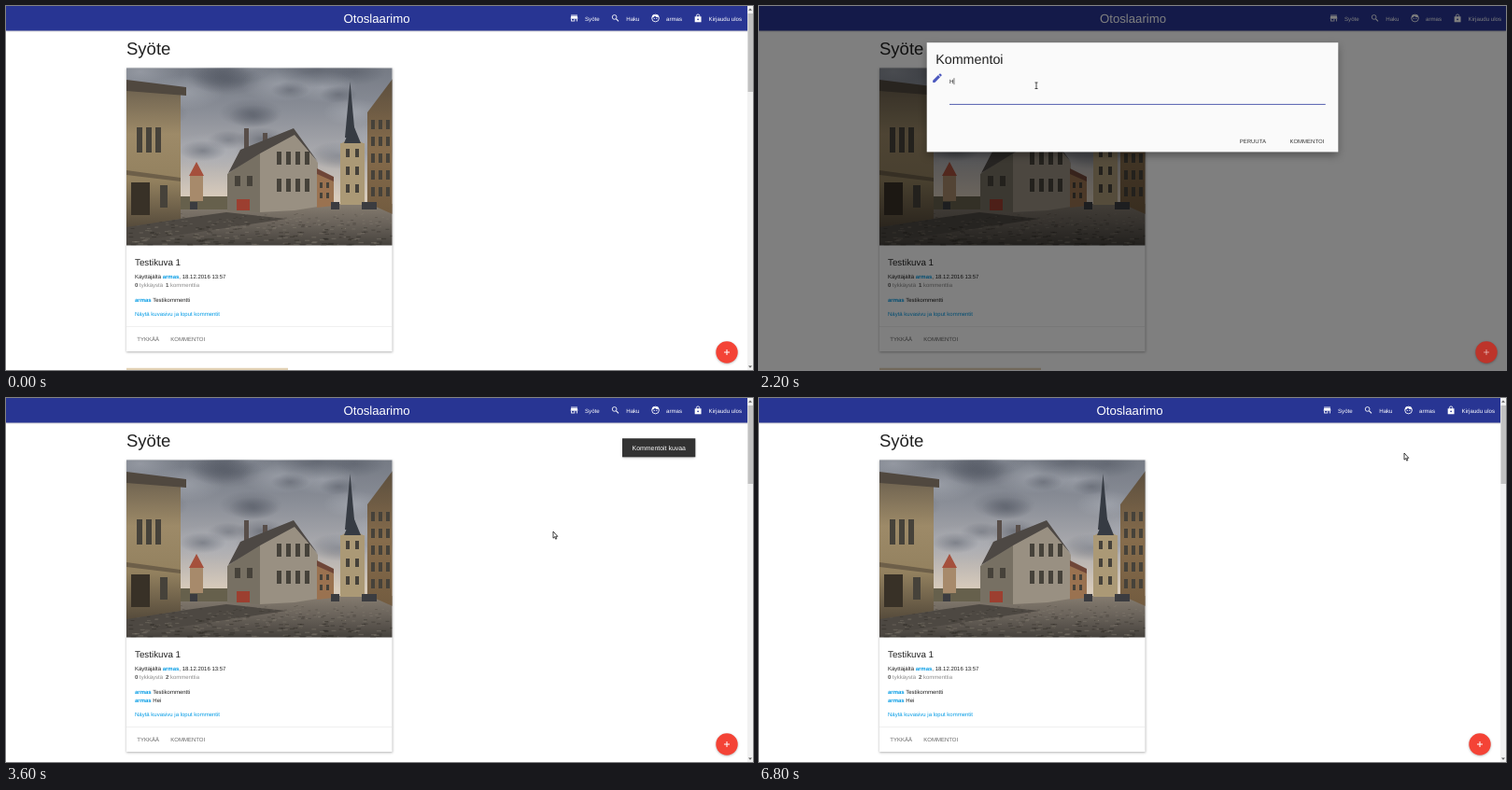
These frames come from a looping animation (800 by 390 pixels, 6900 ms). An HTML page with a canvas:

```html
<!DOCTYPE html>
<html lang="fi">
<head>
<meta charset="utf-8">
<title>Otoslaarimo</title>
<style>
html, body { margin: 0; width: 100%; height: 100%; overflow: hidden; background: #fff; }
canvas { display: block; width: 800px; height: 390px; }
</style>
</head>
<body>
<canvas id="stage"></canvas>
<script>
const W = 800, H = 390, LOOP = 6900, STEP = 100;
const FONT = '"Liberation Sans", Arial, sans-serif';
const USER = 'armas', SITE = 'Otoslaarimo';
const BLUE = '#039be5', INK = '#212121', GRAY = '#8c8c8c';

// Times of the main events, in ms
const OPEN = 700, MODAL_IN = 930, TYPE = 2200, SENT = 3400;
const TOAST_IN = 3306, TOAST_OUT = 6300;

// The pointer spends MOVE ms on the way to each stop and arrives at its time
const MOVE = 600;
const STOPS = [
  { t: 500, x: 196, y: 356 },
  { t: 1100, x: 286, y: 162 },
  { t: 1700, x: 297, y: 85 },
  { t: 3000, x: 586, y: 143 },
  { t: 4400, x: 180, y: 322 },
  { t: 6300, x: 691, y: 59 }
];

const canvas = document.getElementById('stage');
const ratio = window.devicePixelRatio || 1;
canvas.width = W * ratio;
canvas.height = H * ratio;
const ctx = canvas.getContext('2d');

const clamp = v => Math.max(0, Math.min(1, v));
const mix = (a, b, p) => a + (b - a) * p;
const easeOut = (p, power) => 1 - Math.pow(1 - clamp(p), power);

function seeded(seed) {
  return () => (seed = (seed * 16807) % 2147483647) / 2147483647;
}

function rect(x, y, w, h, color) {
  ctx.fillStyle = color;
  ctx.fillRect(x, y, w, h);
}

function poly(color, ...pts) {
  ctx.fillStyle = color;
  ctx.beginPath();
  for (let i = 0; i < pts.length; i += 2) ctx.lineTo(pts[i], pts[i + 1]);
  ctx.fill();
}

function triangle(x, y, half, h, color) {
  poly(color, x, y, x + half, y + h, x - half, y + h);
}

function circle(x, y, r, color, line = 0) {
  ctx.beginPath();
  ctx.arc(x, y, r, 0, Math.PI * 2);
  ctx.fillStyle = ctx.strokeStyle = color;
  ctx.lineWidth = line;
  if (line) ctx.stroke();
  else ctx.fill();
}

// Returns the x where the text ends
function text(str, x, y, size, color, weight = 400) {
  ctx.font = `${weight} ${size}px ${FONT}`;
  ctx.textRendering = 'geometricPrecision';
  ctx.fillStyle = color;
  ctx.fillText(str, x, y);
  return x + ctx.measureText(str).width;
}

// Runs of [string, color, weight] on one line
function line(x, y, ...runs) {
  for (const [str, color, weight] of runs) x = text(str, x, y, 6, color, weight);
}

function shadowed(blur, dy, alpha, draw) {
  ctx.save();
  ctx.shadowColor = `rgba(0,0,0,${alpha})`;
  ctx.shadowBlur = blur * ratio;
  ctx.shadowOffsetY = dy * ratio;
  draw();
  ctx.restore();
}

// Icons are drawn in a 24 by 24 box
const ICONS = {
  store(c) {
    rect(4, 4, 16, 2, c);
    poly(c, 4, 7, 20, 7, 21, 14, 3, 14);
    rect(4, 14, 2, 6, c);
    rect(12, 14, 2, 6, c);
    rect(18, 14, 2, 6, c);
    rect(6, 18, 6, 2, c);
  },
  search(c) {
    circle(9.5, 9.5, 5.5, c, 2);
    poly(c, 13, 15, 15, 13, 20.5, 19, 19, 20.5);
  },
  face(c) {
    circle(12, 12, 9, c, 2);
    poly(c, 3, 11, 6, 4, 18, 4, 21, 10, 15, 9.5, 10.5, 6.5, 7, 10);
    circle(9, 13, 1.3, c);
    circle(15, 13, 1.3, c);
  },
  lock(c) {
    circle(12, 6.5, 4, c, 2);
    rect(4, 8, 16, 14, c);
    circle(12, 15, 2, '#283593');
  },
  edit(c) {
    poly(c, 3, 21, 3, 17, 14, 6, 18, 10, 7, 21);
    poly(c, 15, 5, 18, 2.5, 21.5, 6, 19, 9);
  }
};

function icon(name, cx, cy, size, color) {
  ctx.save();
  ctx.translate(cx - size / 2, cy - size / 2);
  ctx.scale(size / 24, size / 24);
  ICONS[name](color);
  ctx.restore();
}

function vertical(y0, y1, ...colors) {
  const g = ctx.createLinearGradient(0, y0, 0, y1);
  colors.forEach((c, i) => g.addColorStop(i / (colors.length - 1), c));
  return g;
}

function cloud(x, y, r, color) {
  ctx.save();
  ctx.translate(x, y);
  ctx.scale(r, r * .45);
  const g = ctx.createRadialGradient(0, 0, 0, 0, 0, 1);
  g.addColorStop(0, `rgba(${color},.5)`);
  g.addColorStop(1, `rgba(${color},0)`);
  circle(0, 0, 1, g);
  ctx.restore();
}

// A wall seen at an angle: top and bottom edges run from x0 to x1
function wall(color, x0, x1, top0, top1, low0, low1) {
  poly(color, x0, top0, x1, top1, x1, low1, x0, low0);
}

function windows(x, y, cols, rows, dx, dy, w, h) {
  for (let i = 0; i < cols; i++)
    for (let j = 0; j < rows; j++) rect(x + i * dx, y + j * dy, w, h, '#46423a');
}

function sky() {
  const rnd = seeded(11);
  rect(129, 66, 285, 150, vertical(66, 205, '#757a84', '#8a8e97', '#aaaaae', '#d8cbbb'));
  for (let i = 0; i < 26; i++) {
    const y = mix(66, 160, rnd());
    cloud(mix(129, 414, rnd()), y, mix(20, 50, rnd()), i % 3 ? '82,87,98' : '176,180,188');
  }
}

function street() {
  const rnd = seeded(5);
  rect(129, 212, 285, 45, vertical(212, 257, '#857c70', '#686159', '#45413c'));
  poly('#4d4842', 129, 236, 236, 221, 300, 228, 129, 254);
  for (let i = 0; i < 350; i++) {
    const d = rnd();
    rect(mix(129, 414, rnd()), 222 + 35 * d, 2 + 4 * d, .5 + d, i % 2 ? 'rgba(35,32,28,.35)' : 'rgba(165,155,140,.25)');
  }
}

function photo() {
  ctx.save();
  ctx.beginPath();
  ctx.rect(129, 66.5, 284.5, 190);
  ctx.clip();
  sky();
  street();

  // Round tower and town wall
  rect(186, 204, 52, 14, '#66604c');
  rect(197, 181, 14, 28, '#a78a6b');
  triangle(204, 167, 8, 15, '#a5503c');

  // Left building
  wall(vertical(88, 236, '#6f6350', '#9d8a68', '#93815f', '#574c3c'), 129, 187, 88, 92, 237, 228);
  wall('#50483f', 129, 193, 79, 87, 91, 96);
  wall('#6d5f49', 129, 187, 176, 184, 181, 188);
  windows(140, 130, 3, 1, 10, 0, 6, 27);
  rect(134, 189, 20, 35, '#383127');
  windows(165, 192, 1, 1, 0, 0, 8, 24);

  // Middle house
  rect(255, 131, 5, 24, '#584e49');
  rect(275, 136, 5, 15, '#584e49');
  wall('#777063', 237, 272, 180, 156, 219, 221);
  wall('#999082', 272, 309, 154, 134, 221, 219);
  wall('#999082', 309, 334, 134, 168, 219, 215);
  poly('#4d4844', 238, 179, 251, 154, 308, 131, 334, 167, 309, 138, 272, 158);
  windows(290, 156, 4, 2, 10, 29, 5, 14);
  windows(245, 182, 2, 1, 13, 0, 6, 11);
  rect(247, 207, 14, 12, '#9c3f30');

  // Side street
  wall('#9a7250', 333, 351, 178, 185, 216, 214);
  wall('#6f4638', 333, 351, 174, 183, 180, 188);
  windows(336, 189, 2, 2, 7, 11, 3, 6);

  // Church
  wall('#ab9976', 358, 384, 147, 147, 213, 213);
  triangle(371, 140, 13, 8, '#ab9976');
  triangle(371, 125, 9, 22, '#363b43');
  triangle(368.5, 81, 5.5, 60, '#363b43');
  windows(364, 153, 2, 3, 10, 19, 4, 9);

  // Right building
  wall(vertical(85, 220, '#5f513f', '#866c4c', '#735c40'), 387, 414, 114, 78, 211, 223);
  windows(391, 122, 3, 5, 8, 18, 4, 10);

  // Cars
  for (const [x, w] of [[197, 8], [348, 9], [381, 16]]) rect(x, 210, w, 8, '#3b3c40');
  ctx.restore();
}

function nav(shift) {
  shadowed(2, .5, .25, () => rect(0, 0, W, 26.5, '#283593'));
  ctx.textAlign = 'center';
  text(SITE, 397 + shift / 2, 18, 13.2, '#fff');
  ctx.textAlign = 'left';
  const items = { store: 'Syöte', search: 'Haku', face: USER, lock: 'Kirjaudu ulos' };
  let x = 608.5 + shift;
  for (const name in items) {
    icon(name, x, 13, 10.3, '#fff');
    x = text(items[name], x + 11.5, 15.5, 6.15, '#fff') + 17;
  }
}

function card(comments) {
  const extra = (comments - 1) * 9;
  shadowed(2.5, .8, .3, () => rect(129, 66.5, 284.5, 303.5 + extra, '#fff'));
  photo();
  text('Testikuva 1', 138, 278.3, 9.8, INK);
  line(138, 291.8, ['Käyttäjältä ', INK], [USER, BLUE, 700], [', 18.12.2016 13:57', INK]);
  line(138, 301.2, ['0', '#555', 700], [' tykkäystä', GRAY]);
  line(171, 301.2, [String(comments), '#555', 700], [' kommenttia', GRAY]);
  ['Testikommentti', 'Hei'].slice(0, comments).forEach((body, i) =>
    line(138, 317 + i * 9.3, [USER, BLUE, 700], [' ' + body, INK]));
  line(138, 332.3 + extra, ['Näytä kuvasivu ja loput kommentit', BLUE]);
  rect(129, 343 + extra, 284.5, .5, '#e0e0e0');
  line(140.3, 358.8 + extra, ['TYKKÄÄ', '#666']);
  line(176.3, 358.8 + extra, ['KOMMENTOI', '#666']);
}

function page(shift, comments) {
  rect(0, 0, W, H, '#fff');
  text('Syöte', 129, 52, 18.5, INK);
  card(comments);
  if (comments === 1) rect(129, 387.8, 173, 4, '#e3d2b5');
  nav(shift);
}

function scrollbar() {
  rect(794, 0, 6, H, '#f1f1f1');
  rect(794.5, 8, 5.5, 84, '#c1c1c1');
  triangle(797, 2.5, 2, 2.3, '#606060');
  triangle(797, 387.8, 2, -2.3, '#606060');
}

function addButton(shift, shade) {
  const x = 772 + shift, y = 371, k = 1 - shade * .45;
  const color = `rgb(${244 * k},${67 * k},${54 * k})`;
  shadowed(2.5, .8, .3, () => circle(x, y, 11.7, color));
  ctx.globalAlpha = 1 - shade;
  rect(x - 3, y - .5, 6, 1, '#fff');
  rect(x - .5, y - 3, 1, 6, '#fff');
  ctx.globalAlpha = 1;
}

const modalProgress = t => easeOut((t - MODAL_IN) / 490, 3);

function modal(t) {
  const p = modalProgress(t);
  if (p <= 0) return;
  ctx.save();
  ctx.globalAlpha = p;
  ctx.translate(400, mix(15.6, 39.2, p));
  ctx.scale(mix(.7, 1, p), 1);
  ctx.translate(-220.3, 0);
  shadowed(9, 4, .4, () => rect(0, 0, 440.6, 117.2, '#fafafa'));
  text('Kommentoi', 9.5, 23, 14.3, INK);
  icon('edit', 11.2, 38, 12.5, '#4a57be');
  const typed = 'Hei'.slice(0, t < TYPE ? 0 : 1 + Math.floor((t - TYPE) / 150));
  const end = text(typed, 24.3, 44, 6.2, INK);
  const typing = t >= TYPE && t < TYPE + 500;
  if (typing || (t - MODAL_IN) % 1000 < 500) rect(end + .2, 38, .6, 7, INK);
  rect(24.3, 65.7, 402.7, 1, '#5560b0');
  line(335, 107.6, ['PERUUTA', '#343434']);
  line(388.7, 107.6, ['KOMMENTOI', '#343434']);
  ctx.restore();
}

function overlayAlpha(t) {
  if (t < SENT) return .5 * modalProgress(t);
  return .5 * (1 - easeOut((t - SENT + 20) / 250, 4));
}

function toast(t) {
  const enter = easeOut((t - TOAST_IN) / 300, 3);
  const leave = easeOut((t - TOAST_OUT) / 375, 5);
  const alpha = enter * (1 - leave);
  if (alpha <= 0) return;
  ctx.save();
  ctx.globalAlpha = alpha;
  ctx.translate(0, 15 * (1 - enter) - 17 * leave);
  shadowed(3, 1, .35, () => rect(660, 43.3, 78.3, 20, '#323232'));
  text('Kommentoit kuvaa', 670.5, 55.8, 6.95, '#fff');
  ctx.restore();
}

function pointerAt(t) {
  let { x, y } = { x: 196, y: 400 };
  for (const stop of STOPS) {
    const p = clamp((t - stop.t + MOVE) / MOVE), s = p * p * (3 - 2 * p);
    x = mix(x, stop.x, s);
    y = mix(y, stop.y, s);
  }
  return [x, y];
}

function cursor(t) {
  ctx.save();
  ctx.translate(...pointerAt(t));
  if (t >= 1500 && t < 2600) {
    rect(-.4, -3, .8, 6.5, INK);
    rect(-1.5, -3.4, 3, .8, INK);
    rect(-1.5, 3, 3, .8, INK);
  } else {
    poly('#fff', 0, 0, 0, 7.2, 1.6, 5.7, 2.7, 8.2, 3.8, 7.7, 2.7, 5.3, 4.8, 5.3);
    ctx.closePath();
    ctx.strokeStyle = '#111';
    ctx.lineWidth = .8;
    ctx.stroke();
  }
  ctx.restore();
}

function draw(t) {
  ctx.setTransform(ratio, 0, 0, ratio, 0, 0);
  const open = t >= OPEN && t < SENT;
  const shift = open ? 7 : 0;
  const shade = overlayAlpha(t);
  page(shift, t < SENT ? 1 : 2);
  rect(0, 0, W, H, `rgba(0,0,0,${shade})`);
  addButton(shift, shade);
  if (open) modal(t);
  else scrollbar();
  if (t >= 3100 && t < 3600) rect(0, 383.5, 40, 6.5, 'rgba(242,242,242,.4)');
  toast(t);
  cursor(t);
}

const start = performance.now();
function tick() {
  const t = (performance.now() - start) % LOOP;
  draw(Math.floor(t / STEP) * STEP);
  requestAnimationFrame(tick);
}
tick();
</script>
</body>
</html>
```
